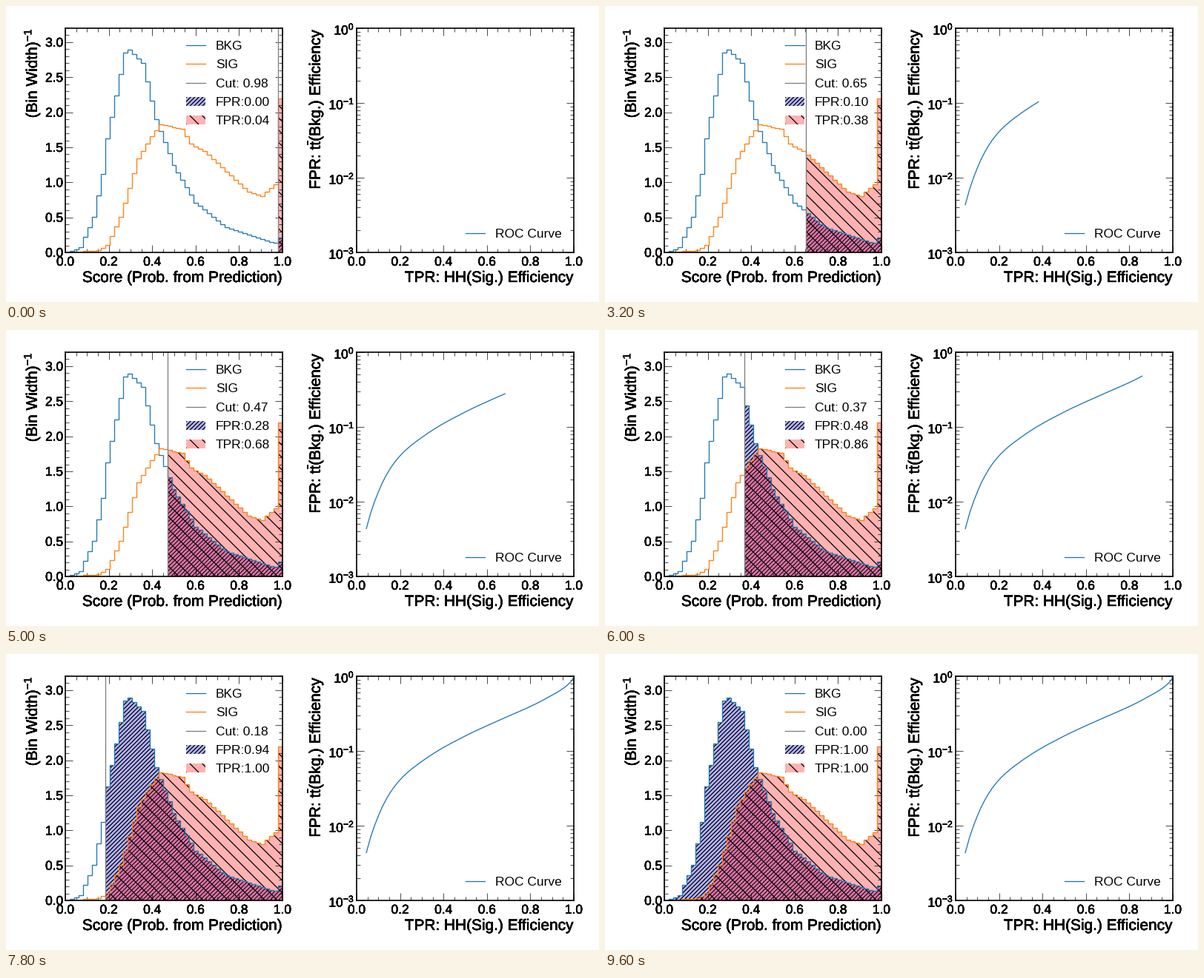
A matplotlib script that plays this animation: 800 by 400 pixels, repeating every 9.8 s.

```python
import numpy as np
import matplotlib.pyplot as plt
from matplotlib.animation import FuncAnimation
from matplotlib.lines import Line2D
from matplotlib.patches import Patch
from matplotlib.patheffects import Normal, Stroke
from matplotlib.ticker import AutoMinorLocator, MultipleLocator

W, H, DPI = 800, 400, 100
BINS = 49
BLUE, ORANGE = "#1f77b4", "#ff7f0e"
BKG_STYLE = dict(facecolor=(0, 0, 1, 0.3), hatch="//////", linewidth=0)
SIG_STYLE = dict(facecolor=(1, 0, 0, 0.3), hatch="\\\\", linewidth=0)
HEAVY = [Stroke(linewidth=0.3, foreground="black")] + [Normal()] * 4

plt.rcParams.update({
    "font.family": "Liberation Sans",
    "font.size": 15,
    "mathtext.fontset": "custom",
    "mathtext.rm": "Liberation Sans",
    "mathtext.default": "regular",
    "axes.linewidth": 1.2,
    "lines.linewidth": 0.95,
    "legend.fontsize": "small",
    "legend.frameon": False,
    "legend.handlelength": 1.5,
    "legend.labelspacing": 0.59,
    "legend.borderpad": 0.46,
    "hatch.linewidth": 0.9,
})


def density(*knots):
    """Unit-area histogram through a few (bin, height) points."""
    heights = np.interp(np.arange(BINS), *zip(*knots))
    return heights / heights.mean()


def efficiency(heights):
    """Fraction above each cut, from the highest cut down."""
    return np.cumsum(heights[::-1]) / heights.sum()


edges = np.linspace(0, 1, BINS + 1)
bkg = density((0, 0), (3, .07), (6, .5), (8, 1.1), (9, 1.6), (13, 2.81),
              (14, 2.85), (17, 2.66), (20, 1.87), (24, 1.23), (29, .7),
              (36, .35), (47, .13), (48, .21))
sig = density((0, 0), (7, .03), (9, .1), (12, .5), (16, 1.33), (19, 1.65),
              (21, 1.82), (26, 1.75), (28, 1.54), (31, 1.44), (36, 1.15),
              (41, .86), (44, .8), (47, .97), (48, 2.18))
fpr, tpr = efficiency(bkg), efficiency(sig)

fig = plt.figure(figsize=(W / DPI, H / DPI), dpi=DPI, facecolor="white")


def add_axes(left):
    ax = fig.add_axes([left / W, 67 / H, 293 / W, 303 / H])
    ax.set_xlim(0, 1)
    ax.xaxis.set_major_locator(MultipleLocator(0.2))
    ax.xaxis.set_minor_locator(AutoMinorLocator(4))
    return ax


def style_ticks(ax):
    ax.tick_params(which="both", direction="in", top=True, right=True,
                   width=0.5, labelsize="small")
    ax.tick_params(which="major", length=7)
    ax.tick_params(which="minor", length=3.5)
    ax.tick_params(axis="x", pad=4.2)
    ax.tick_params(axis="y", pad=2)
    for text in ax.get_xticklabels() + ax.get_yticklabels():
        text.set_path_effects(HEAVY)


def label(x, y, text, rotation=0):
    fig.text(x / W, 1 - y / H, text, ha="right", va="baseline",
             rotation=rotation, rotation_mode="anchor", path_effects=HEAVY)


hist_ax = add_axes(80)
hist_ax.set_ylim(0, 3.2)
hist_ax.yaxis.set_major_locator(MultipleLocator(0.5))
hist_ax.yaxis.set_minor_locator(AutoMinorLocator(5))
for heights, color in ((bkg, BLUE), (sig, ORANGE)):
    hist_ax.stairs(heights, edges, color=color, lw=0.95, zorder=2)
cut_line = hist_ax.axvline(1, color="grey", zorder=2.1)
style_ticks(hist_ax)

roc_ax = add_axes(473)
roc_ax.set_yscale("log")
roc_ax.set_ylim(1e-3, 1)
roc_line, = roc_ax.plot([], [], color=BLUE, label="ROC Curve")
roc_ax.legend(loc="lower right")
style_ticks(roc_ax)

label(373, 373, "Score (Prob. from Prediction)")
label(766, 373, "TPR: HH(Sig.) Efficiency")
label(42, 30, r"(Bin Width)$^{-1}$", 90)
label(424, 30, r"FPR: t$\bar{t}$(Bkg.) Efficiency", 90)

fills = []


def fill_above(first, heights, style):
    tops = np.append(heights[first:], heights[-1])
    fills.append(hist_ax.fill_between(edges[first:], tops, step="post",
                                      zorder=1, **style))


def draw(step):
    first = BINS - 1 - step
    cut = edges[first]
    while fills:
        fills.pop().remove()
    fill_above(first, bkg, BKG_STYLE)
    fill_above(first, sig, SIG_STYLE)
    cut_line.set_xdata([cut, cut])
    roc_line.set_data(tpr[:step + 1], fpr[:step + 1])
    hist_ax.legend(loc="upper right", handles=[
        Line2D([], [], color=BLUE, label="BKG"),
        Line2D([], [], color=ORANGE, label="SIG"),
        Line2D([], [], color="grey", label=f"Cut: {cut:.2f}"),
        Patch(label=f"FPR:{fpr[step]:.2f}", **BKG_STYLE),
        Patch(label=f"TPR:{tpr[step]:.2f}", **SIG_STYLE),
    ])


anim = FuncAnimation(fig, draw, frames=BINS, interval=200, repeat=True)
plt.show()
```
